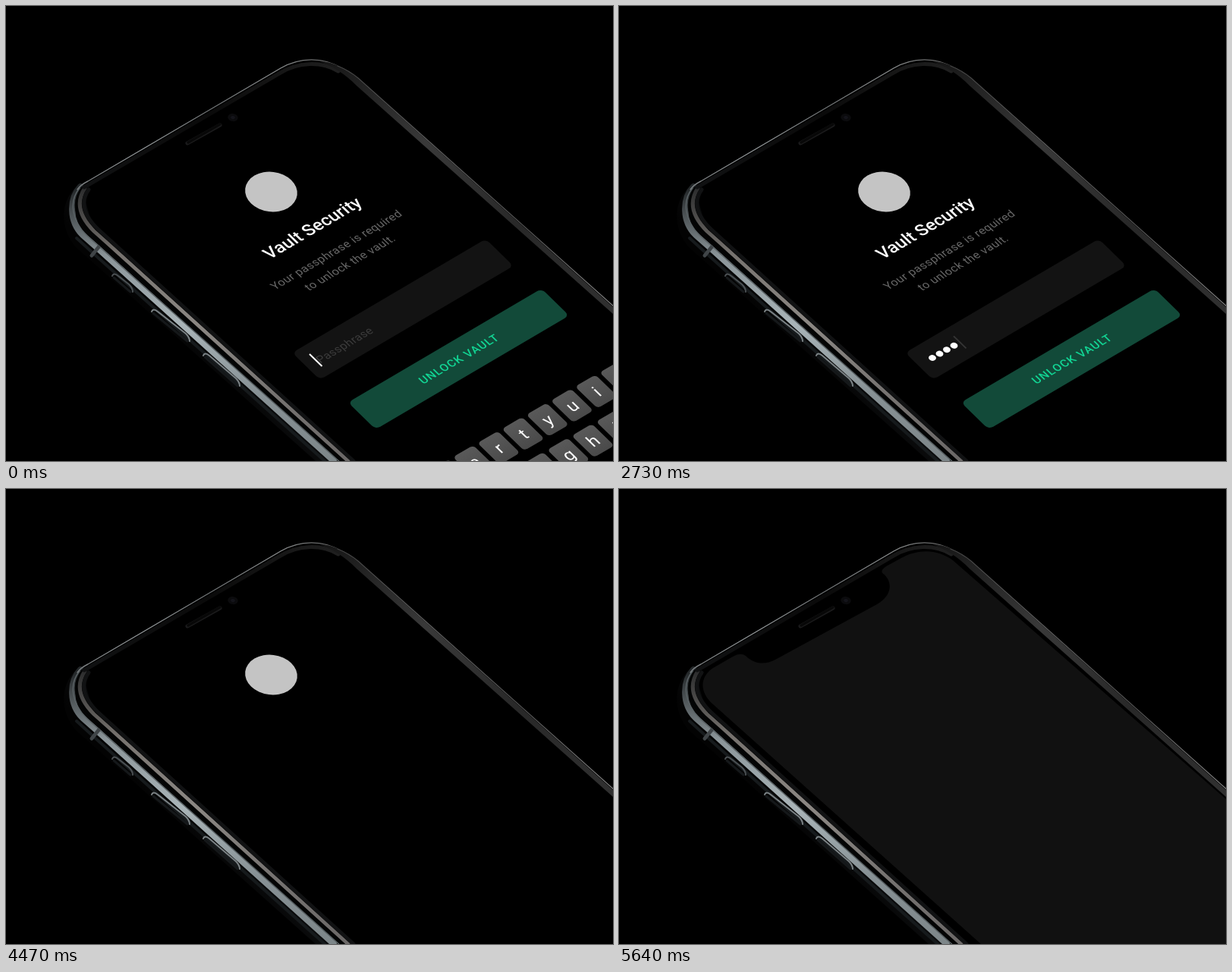
These frames come from a looping animation (800 px wide and 600 px high, 5790 ms). An HTML page with a canvas:

```html
<!DOCTYPE html>
<html lang="en">
<head>
<meta charset="utf-8">
<title>Vault unlock</title>
<style>
  html, body { margin: 0; width: 100%; height: 100%; overflow: hidden; background: #000; }
  canvas { display: block; width: 800px; height: 600px; }
</style>
</head>
<body>
<canvas id="stage" width="800" height="600"></canvas>
<script>
const ctx = document.getElementById('stage').getContext('2d');
const LOOP = 5790;
const FONT = 'Roboto, sans-serif';

const clamp = x => Math.max(0, Math.min(1, x));
const span = (t, from, to) => clamp((t - from) / (to - from));
const lerp = (a, b, p) => a + (b - a) * p;
const easeIn = p => p * p * p;
const easeOut = p => 1 - (1 - p) * (1 - p);
const smooth = p => p * p * (3 - 2 * p);

// Draws in the tilted plane of the phone's screen, centred on (x, y).
function plane(x, y, scale, draw) {
  ctx.save();
  ctx.transform(.862 * scale, -.507 * scale, .72 * scale, .7 * scale, x, y);
  draw();
  ctx.restore();
}

function panel(w, h, r, fill) {
  ctx.fillStyle = fill;
  ctx.beginPath();
  ctx.roundRect(-w / 2, -h / 2, w, h, r);
  ctx.fill();
}

function label(text, size, color, spacing = 0, weight = 400) {
  ctx.font = `${weight} ${size}px ${FONT}`;
  ctx.letterSpacing = spacing + 'px';
  ctx.textAlign = 'center';
  ctx.fillStyle = color;
  ctx.fillText(text, spacing / 2, size * .355);
}

function disc(r, color) {
  ctx.fillStyle = color;
  ctx.beginPath();
  ctx.arc(0, 0, r, 0, Math.PI * 2);
  ctx.fill();
}

function stroke(path, color, width) {
  ctx.strokeStyle = color;
  ctx.lineWidth = width;
  ctx.stroke(new Path2D(path));
}

function gradient(x0, y0, x1, y1, ...colors) {
  const g = ctx.createLinearGradient(x0, y0, x1, y1);
  colors.forEach((c, i) => g.addColorStop(i / (colors.length - 1), c));
  return g;
}

const screenShape = new Path2D(
  'M477 600 L124 284 C106 268 106 248 124 236 L150 221 Q160 215 167 220 ' +
  'C177 230 191 233 206 225 L340 152 C356 143 363 127 350 113 Q342 109 352 102 ' +
  'L372 91 C396 78 421 80 440 94 L800 409 V600 Z');

function drawSideButton(x, y, w, h, color) {
  stroke(`M${x} ${y + 3} Q${x + 2} ${y - 2} ${x + 8} ${y + 3} L${x + w - 5} ${y + h - 10} ` +
    `Q${x + w} ${y + h - 5} ${x + w} ${y + h}`, color, 2);
  stroke(`M${x + 2} ${y + 5} L${x + w - 3} ${y + h}`, '#15181a', 3);
}

function drawPhone() {
  ctx.lineCap = 'round';
  ctx.lineJoin = 'round';

  // Shaded side of the body
  ctx.fillStyle = gradient(75, 280, 115, 245, '#030303', '#0b0c0d');
  ctx.fill(new Path2D('M98 234 C70 255 70 292 92 318 L408 600 H445 L120 310 Z'));

  // Left frame: cool outer band, dark seam, warm inner band
  const cool = gradient(0, 240, 0, 600, '#222628', '#8b9599', '#a9b4b8', '#879195', '#7d8689');
  const warm = gradient(0, 236, 0, 600, '#28292a', '#77736f', '#8b8783', '#767371', '#6b6867');
  stroke('M98 238 C83 254 83 284 101 302 L118 317 L432 600', cool, 8);
  stroke('M97 240 C82 258 87 284 107 303 L441 602', '#5a6265', 1.4);
  stroke('M101 240 C87 258 91 279 111 298 L126 312 L443 600', '#030404', 4);
  stroke('M104 240 C92 258 96 277 116 297 L135 314 L451 600', warm, 5);
  stroke('M109 242 C97 259 103 277 122 295 L458 600', '#111213', 5);
  stroke('M93 306 L116 327 L420 600', '#161a1c', 4);
  stroke('M113 329 L122 318', '#404548', 5);

  // Top and right frame
  stroke('M103 239 L360 89 C386 73 416 73 438 86', gradient(100, 0, 440, 0, '#101112', '#0a0a0a', '#202020'), 5);
  stroke('M94 242 Q98 236 108 231 L362 82 C386 68 418 66 444 83',
    gradient(95, 0, 444, 0, '#777b7d', '#94999b', '#6d7173', '#8a8d8e', '#555'), 1.4);
  ctx.fillStyle = gradient(420, 80, 800, 400, '#171717', '#393939', '#282828', '#303030');
  ctx.fill(new Path2D('M412 73 C435 74 450 84 463 95 L800 397 V406 L462 105 C446 89 432 80 412 73 Z'));
  stroke('M437 79 Q452 85 464 95 L802 397', gradient(437, 79, 800, 397, '#444', '#626262', '#555', '#8a8a8a'), 1.1);

  drawSideButton(140, 353, 27, 24, '#4b5053');
  drawSideButton(192, 400, 50, 42, '#7b8285');
  drawSideButton(260, 458, 48, 43, '#7b8285');

  // Speaker and camera
  stroke('M239 181 L282 157', '#1b1b1c', 5);
  stroke('M240 180 L282 156', '#080808', 3.5);
  plane(299, 147, 1, () => disc(6, '#0b0b0d'));
  plane(299, 147, 1, () => disc(2.5, '#14141a'));
}

function drawKeys(t) {
  const hide = smooth(span(t, 2200, 2700));
  if (hide === 1) return;
  const rows = [['wertyuio', 585, 620], ['dfghjk', 677, 629]];
  for (const [letters, x, y] of rows) {
    [...letters].forEach((key, i) => {
      plane(x + i * 32.2 + hide * 165, y - i * 18.6 + hide * 148, 1, () => {
        panel(31, 41, 5, gradient(0, -20, 0, 20, '#595959', '#4a4a4a'));
        label(key, 23, '#fff');
      });
    });
  }
}

function drawField(t, dots, shift) {
  plane(523 + shift * 26, 400 + shift * 24, 1, () => panel(296, 51, 7, '#131313'));
  if (!dots) plane(446, 447, 1, () => label('Passphrase', 15, '#3c3c3c', .4));
  const dx = shift * 26, dy = shift * 24;
  for (let i = 0; i < dots; i++) {
    plane(413 + 9.5 * i + dx, 464 - 5.4 * i + dy, 1, () => disc(4.4, '#fff'));
  }
  const glow = t < 2100 ? lerp(1, .55, span(t, 1860, 2100))
    : t < 2850 ? lerp(.55, .14, span(t, 2100, 2730))
    : lerp(.14, 0, span(t, 2850, 3000));
  const x = dots ? 402.4 + 9.65 * dots : 400;
  const y = dots ? 459 - 5.9 * dots : 459;
  ctx.save();
  ctx.globalAlpha *= glow;
  ctx.lineCap = 'butt';
  stroke(`M${x} ${y} l16.5 16`, '#fff', 2);
  ctx.restore();
}

function drawButton(t, shift) {
  const press = smooth(span(t, 1950, 2100)) - smooth(span(t, 2190, 2430));
  const mix = (a, b) => Math.round(lerp(a, b, press));
  plane(596.5 + shift * 20, 465.5 + shift * 18, 1 - .026 * press, () => {
    panel(296, 51, 7, `rgb(${mix(18, 18)},${mix(74, 100)},${mix(57, 76)})`);
    label('UNLOCK VAULT', 15, '#12d594', 1, 500);
  });
}

function drawForm(t) {
  const leave = easeIn(span(t, 3600, 4020));
  if (leave === 1) return;
  const dots = [600, 1020, 1320, 1650].filter(at => t >= at).length;
  ctx.save();
  ctx.globalAlpha = 1 - leave;
  const line = (text, x, y, ...style) =>
    plane(x + leave * 20, y + leave * 22, 1, () => label(text, ...style));
  line('Vault Security', 403.5, 292.5, 23, '#fff', 0, 500);
  line('Your passphrase is required', 435, 321.5, 15, '#686868', .4);
  line('to unlock the vault.', 453, 338.5, 15, '#686868', .4);
  drawField(t, dots, leave);
  drawButton(t, leave);
  ctx.restore();
}

function draw(t) {
  ctx.fillStyle = '#000';
  ctx.fillRect(0, 0, 800, 600);
  drawPhone();
  plane(349.5, 245, 1, () => disc(30.6, '#c4c4c4'));
  drawForm(t);
  drawKeys(t);

  // The screen turns to plain dark grey before the loop restarts
  ctx.save();
  ctx.globalAlpha = easeOut(span(t, 5190, 5640));
  ctx.fillStyle = '#111';
  ctx.fill(screenShape);
  ctx.restore();
}

const start = performance.now();
function tick() {
  draw((performance.now() - start) % LOOP);
  requestAnimationFrame(tick);
}
tick();
</script>
</body>
</html>
```
